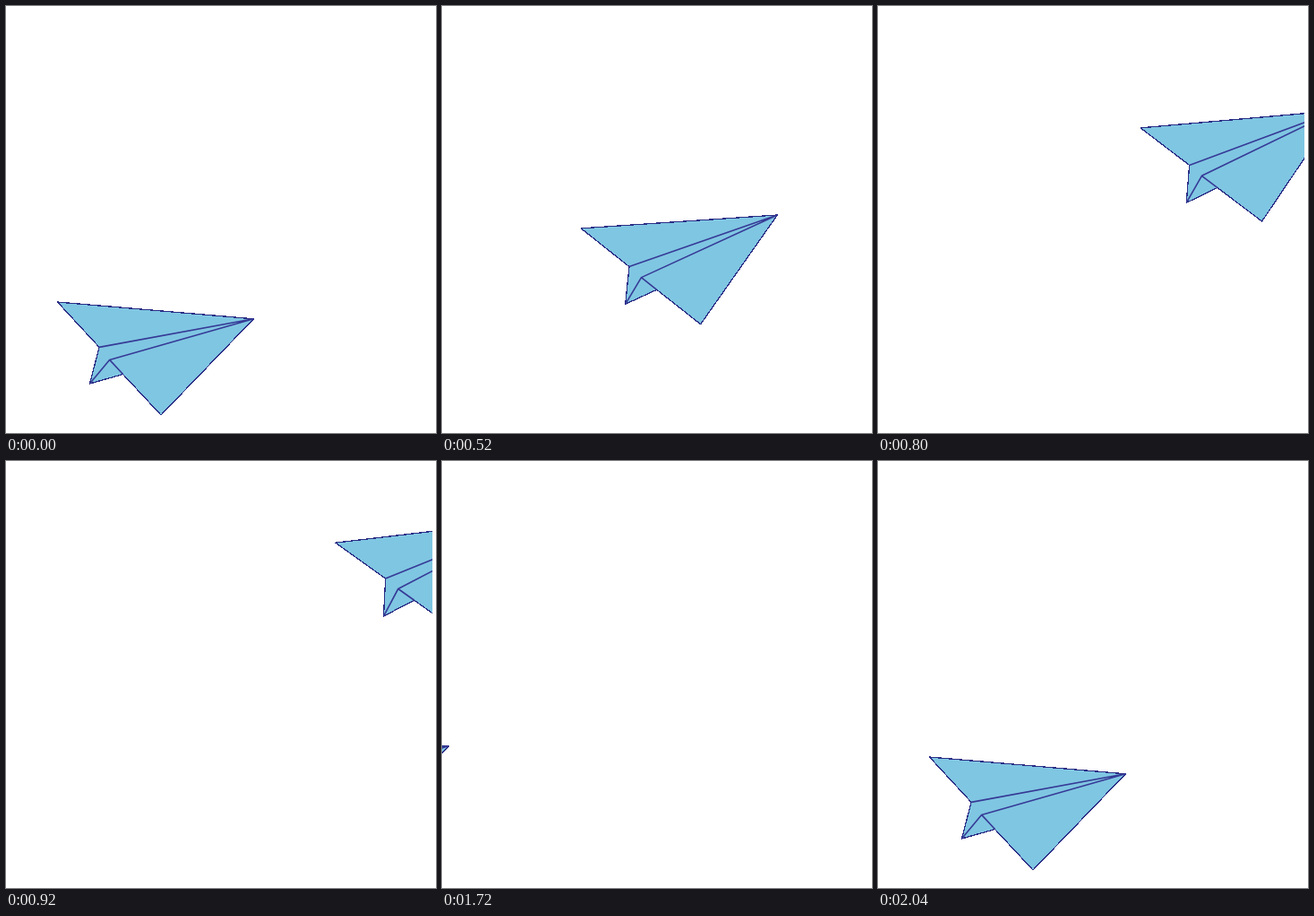
Animation of 480 by 476 pixels, one loop 2760 ms. Source, as an HTML page:

```html
<!DOCTYPE html>
<html lang="en">
<head>
<meta charset="utf-8">
<title>Paper plane</title>
<style>
  html, body { margin: 0; width: 100%; height: 100%; overflow: hidden; background: #fff; }
  svg { display: block; overflow: hidden; }
  path { stroke-linejoin: round; }
  .body { fill: #7fc6e2; stroke: #2b2e86; stroke-width: 1.3; shape-rendering: crispEdges; }
  .folds { fill: none; stroke: #363a96; stroke-width: 1.6; }
</style>
</head>
<body>
<svg width="476" height="476" viewBox="0 0 476 476">
  <g id="plane">
    <path class="body" d="M57.5 330L276.3 348.8L173 456L130.6 410.5L93.5 421L104.1 380.4Z"/>
    <path class="folds" d="M104.1 380.4L276.3 348.8L115.6 394.4L93.5 421M115.6 394.4L130.6 410.5"/>
  </g>
</svg>
<script>
const LOOP = 2760, STEP = 40;
const plane = document.getElementById('plane');

// Poses: x offset, y offset, turn in degrees
const rest = [0, 0, 0];
const lifted = [51, -48.4, -9.9];
const outside = [-269, -31, 0];
// Curve from the lifted pose out past the right edge
const flight = [lifted, [120, -104.6, -7.3], [249, -249, -9], [437.5, -310, -15]];

const mix = (a, b, u) => a.map((v, i) => v + (b[i] - v) * u);

function bezier(points, u) {
  while (points.length > 1) {
    points = points.slice(1).map((p, i) => mix(points[i], p, u));
  }
  return points[0];
}

function pose(t) {
  if (t < 240) return rest;
  if (t < 360) return mix(rest, lifted, (t - 240) / 120);
  if (t < 1080) return bezier(flight, (t - 360) / 720);
  if (t < 1720) return null;
  return mix(outside, rest, Math.min((t - 1720) / 320, 1));
}

function draw(t) {
  const p = pose(t);
  plane.setAttribute('visibility', p ? 'visible' : 'hidden');
  if (p) plane.setAttribute('transform', `translate(${p[0]} ${p[1]}) rotate(${p[2]} 150.5 390.5)`);
}

const start = performance.now();
function tick() {
  const t = (performance.now() - start) % LOOP;
  draw(Math.floor(t / STEP) * STEP);
  requestAnimationFrame(tick);
}
tick();
</script>
</body>
</html>
```
